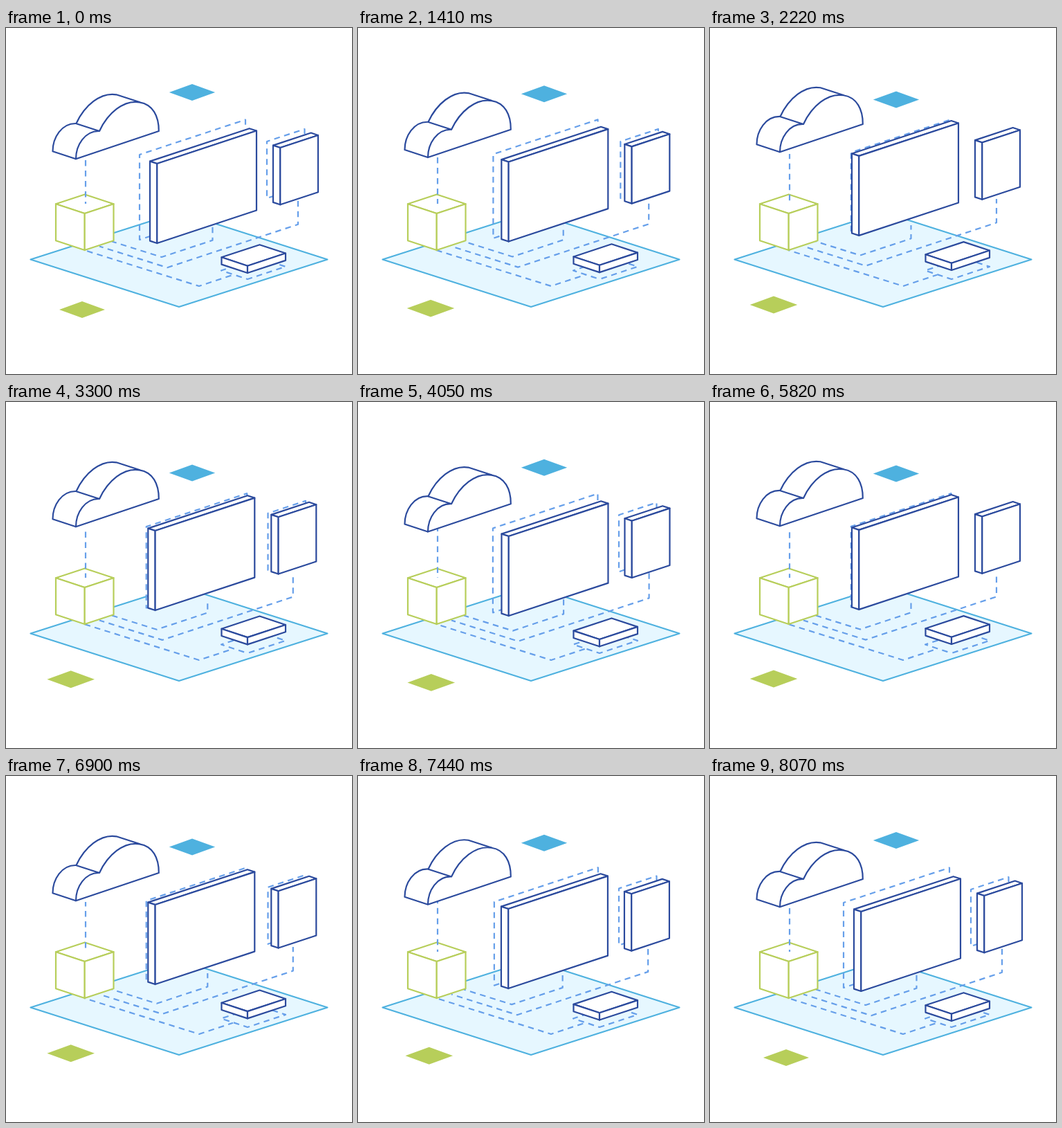
Write an HTML page with a canvas that moves like this. It is 500 px wide and 500 px high and loops after 8.1 s.

```html
<!DOCTYPE html>
<html lang="en">
<head>
<meta charset="utf-8">
<title>Connected devices</title>
<style>
html, body { margin: 0; width: 100%; height: 100%; overflow: hidden; background: #fff; }
canvas { display: block; width: 500px; height: 500px; }
</style>
</head>
<body>
<canvas id="stage" width="500" height="500"></canvas>
<script>
const ctx = document.getElementById('stage').getContext('2d');
const LOOP = 8100, HOLD = 900, SWAY = 3600, FRAME = 30;
const NAVY = '#2b4a9d', DASH = '#669fea', GREEN = '#b7ce5a', BLUE = '#4eb1df', FLOOR = '#e6f7ff';
const DASH_LEN = 8.5, GAP = 6.5, PERIOD = DASH_LEN + GAP;
const DASH_SPEED = 23 * PERIOD / (LOOP - HOLD);
const SLOPE = 0.33, FLOOR_SLOPE = 0.313;

function paint(path, fill, stroke) {
  if (fill) { ctx.fillStyle = fill; ctx.fill(path); }
  if (stroke) { ctx.strokeStyle = stroke; ctx.stroke(path); }
}

function poly(points, closed = true) {
  const path = new Path2D();
  points.forEach(([x, y]) => path.lineTo(x, y));
  if (closed) path.closePath();
  return path;
}

// shift is the distance from the path start to a dash start
function dashed(points, shift, closed = false) {
  ctx.save();
  ctx.setLineDash([DASH_LEN, GAP]);
  ctx.lineDashOffset = -shift;
  paint(poly(points, closed), null, DASH);
  ctx.restore();
}

function diamond(x, y, w, h, fill, stroke) {
  paint(poly([[x - w, y], [x, y - h], [x + w, y], [x, y + h]]), fill, stroke);
}

// flat tile seen from its front corner
function tile(x, y, left, right) {
  return [[x, y], [x - left, y - left * SLOPE],
    [x + right - left, y - (left + right) * SLOPE], [x + right, y - right * SLOPE]];
}

function prism(x, y, left, right, height, color) {
  paint(poly(tile(x, y, left, right)), '#fff', color);
  for (const run of [-left, right]) {
    const far = y - Math.abs(run) * SLOPE;
    paint(poly([[x, y], [x + run, far], [x + run, far + height], [x, y + height]]), '#fff', color);
  }
}

// floor line that leaves the cube, turns, then rises to a device
function trail(x, y, out, back, top, flow) {
  const turn = y + out * FLOOR_SLOPE, end = x + out + back;
  const points = [[x, y], [x + out, turn], [end, turn - back * SLOPE]];
  if (top) points.push([end, top]);
  dashed(points.reverse(), 2.7 - flow);
}

// dashed outline behind a standing device
function shadow(x, y, w, h, tail, flow) {
  const right = x + w, peak = y - w * SLOPE, foot = y + h;
  dashed([[right, peak + 10], [right, peak], [x, y], [x, foot], [x + tail, foot - tail * SLOPE]], 2.7 - flow);
}

function drawFloor(flow, sway) {
  const pull = 9.6 * sway;
  diamond(250, 334.5, 214.5, 68.5, FLOOR, BLUE);
  trail(153, 308.5, 72 - pull, 73.5, 285, flow);
  trail(135, 315.5, 98 - pull, 189, 247, flow);
  trail(113, 321, 166, 49, 0, flow);
  dashed(tile(349, 363, 38, 55), 8.7 + flow, true);
}

function drawCloud(flow, sway) {
  const ridge = 'c0 -20 13 -41 34 -40.3 c12 -26 35 -45.5 58 -41.7';
  dashed([[115, 182], [115, 254]], 9 + flow);
  ctx.save();
  ctx.translate(0, -12 * sway);
  paint(new Path2D(`M101 189.3 L67.5 178.3 ${ridge} l34 11`), '#fff', NAVY);
  paint(new Path2D(`M101 189.3 ${ridge} c19 3 28 20 27.8 41.7 Z M101 138 l34 11`), '#fff', NAVY);
  ctx.restore();
}

function drawDevices(flow, sway, slip) {
  shadow(193 + 13 * sway, 183 - 3.8 * sway, 153 - 10 * sway, 123 - 7.6 * sway, 15, flow);
  prism(218.3 - 3.6 * sway, 196 - 13.3 * sway, 10.3, 143.7, 115, NAVY);
  shadow(377 + 8 * slip, 164 + 3 * slip - 5 * sway, 54.5, 82, 10, flow);
  prism(396.3 - 3.6 * sway, 173 - 9 * sway, 10.3, 54.7, 82.3, NAVY);
  prism(349, 343.7 - 4.8 * sway, 37.5, 55, 10.3, NAVY);
}

function drawMarkers(sway) {
  const grow = 1.3 * Math.min(1, sway * 8);
  diamond(269, 93 + 12.5 * sway, 33.2, 12, BLUE);
  diamond(110 - 20 * sway - grow, 407 - 7.8 * sway - grow / 3, 33 + grow, 12 + grow / 3, GREEN);
}

function draw(now) {
  const time = Math.floor((now % LOOP) / FRAME) * FRAME;
  const part = Math.max(0, time - HOLD) % SWAY;
  const sway = (1 - Math.cos(2 * Math.PI * part / SWAY)) / 2;
  const slip = part < 2800 ? Math.sin(Math.PI * part / 2800) ** 2 : 0;
  const flow = DASH_SPEED * Math.max(0, time - HOLD + FRAME) % PERIOD;

  ctx.fillStyle = '#fff';
  ctx.fillRect(0, 0, 500, 500);
  ctx.lineWidth = 2.2;
  ctx.lineJoin = 'round';
  drawFloor(flow, sway);
  prism(113.7, 268, 41.7, 41.8, 53, GREEN);
  drawCloud(flow, sway);
  drawDevices(flow, sway, slip);
  drawMarkers(sway);
}

function tick() {
  draw(performance.now());
  requestAnimationFrame(tick);
}
tick();
</script>
</body>
</html>
```
